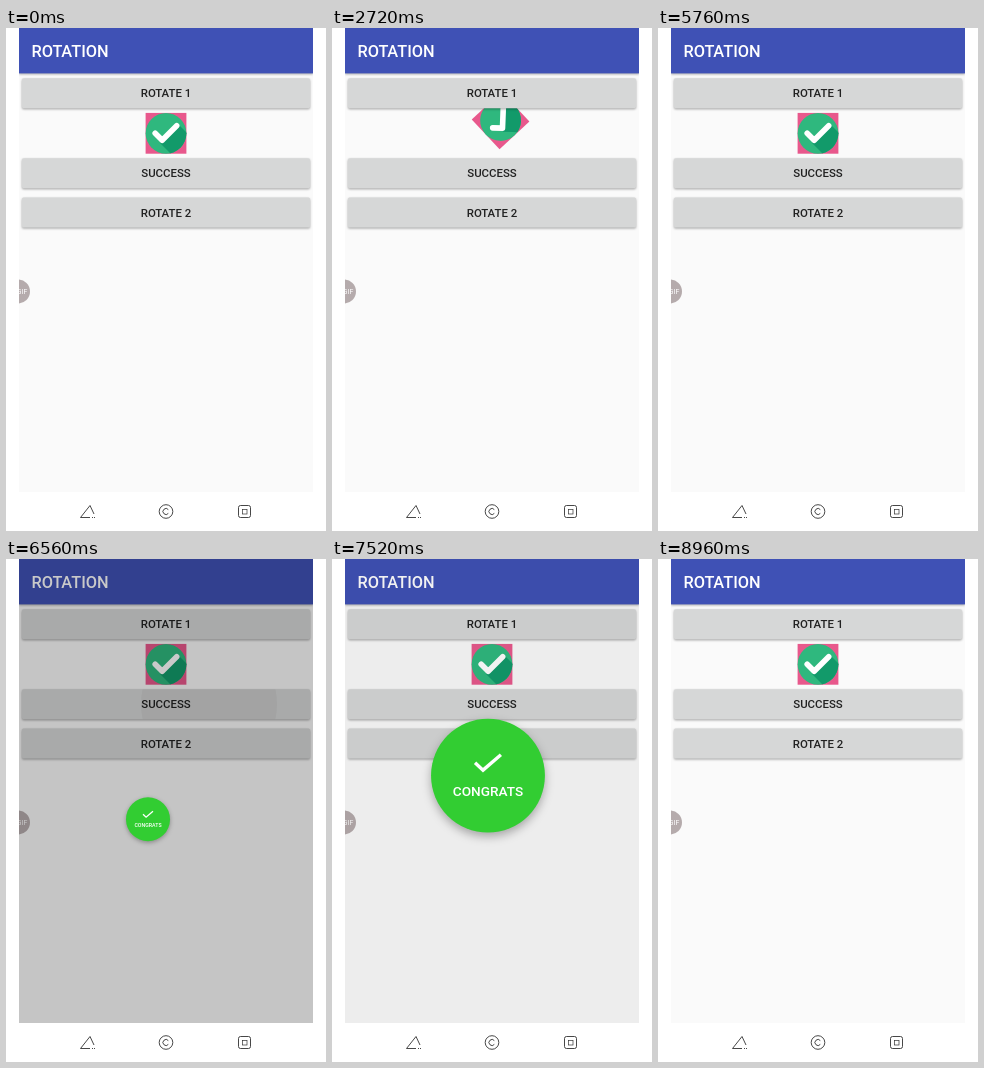
Write an HTML page that moves like this. It is 320 by 503 pixels and loops after 9600 ms.

```html
<!DOCTYPE html>
<html lang="en">
<head>
<meta charset="utf-8">
<title>Rotation</title>
<style>
  html, body { margin: 0; width: 100%; height: 100%; overflow: hidden; background: #fff; }
  svg { display: block; width: 320px; height: 503px; }
  text { font-family: Roboto, sans-serif; font-weight: 500; }
  .button { fill: #d6d7d7; filter: drop-shadow(0 1px .8px rgba(0, 0, 0, .35)); }
  .label { font-size: 11.43px; fill: #212121; text-anchor: middle; }
  .check { fill: none; stroke: #fff; }
  .nav { fill: none; stroke: #333; stroke-width: .9; }
  #bar { fill: #3f51b5; filter: drop-shadow(0 1px 1px rgba(0, 0, 0, .3)); }
  #disc { fill: #32cd32; filter: drop-shadow(0 4px 5px rgba(0, 0, 0, .3)); }
</style>
</head>
<body>
<svg viewBox="0 0 320 503">
  <defs>
    <clipPath id="app"><rect x="13" width="294" height="464"/></clipPath>
    <clipPath id="round"><circle cx="160" cy="105.3" r="20.4"/></clipPath>
    <clipPath id="clip1"><rect x="16" y="50.3" width="288" height="29.9" rx="1.6"/></clipPath>
    <clipPath id="clip2"><rect x="16" y="130.3" width="288" height="29.9" rx="1.6"/></clipPath>
  </defs>

  <g clip-path="url(#app)">
    <rect x="13" width="294" height="464" fill="#fafafa"/>
    <rect id="bar" x="13" width="294" height="45.4"/>
    <text x="25.6" y="29" font-size="16.33" fill="#fff">ROTATION</text>

    <g id="badge">
      <rect x="139.6" y="84.9" width="40.8" height="40.8" fill="#e8588c"/>
      <g clip-path="url(#round)">
        <rect x="139" y="84" width="42" height="42" fill="#2fb87e"/>
        <path d="M154 115 L173 97 L195 119 L176 137 Z" fill="#129a6a"/>
      </g>
      <path class="check" d="M149.2 105.3 L156.2 112.2 L170.7 97.8"
            stroke-width="5.6" stroke-linecap="round" stroke-linejoin="round"/>
    </g>

    <rect class="button" x="16" y="50.3" width="288" height="29.9" rx="1.6"/>
    <rect class="button" x="16" y="130.3" width="288" height="29.9" rx="1.6"/>
    <rect class="button" x="16" y="169.6" width="288" height="29.9" rx="1.6"/>
    <g clip-path="url(#clip1)"><circle id="ripple1" cx="203" cy="65"/></g>
    <g clip-path="url(#clip2)"><circle id="ripple2" cx="203" cy="145"/></g>
    <text class="label" x="160" y="69.2">ROTATE 1</text>
    <text class="label" x="160" y="149.4">SUCCESS</text>
    <text class="label" x="160" y="188.7">ROTATE 2</text>

    <circle cx="12" cy="263.5" r="12" fill="#b5abac"/>
    <text x="10.8" y="266.2" font-size="7" fill="#fff" style="font-weight:400">GIF</text>

    <rect id="dim" x="13" width="294" height="464"/>
    <g id="dialog">
      <circle id="disc" r="57.3"/>
      <path class="check" d="M-13 -13 L-5 -5.5 L13 -21" stroke-width="3.4"/>
      <text y="20.6" font-size="13.7" fill="#fff" text-anchor="middle">CONGRATS</text>
    </g>
  </g>

  <g class="nav">
    <path d="M84 477.5 L74.5 489.5 H84 M84 477.5 L88 486"/>
    <path d="M86 489.5 H89.5" stroke-dasharray="1 1"/>
    <circle cx="160" cy="483.5" r="6.8"/>
    <path d="M162.3 481.6 A3 3 0 1 0 162.3 485.4"/>
    <rect x="232.5" y="477.5" width="12" height="12" rx="2"/>
    <rect x="236.5" y="481.5" width="4.5" height="4.5" stroke-width=".7"/>
  </g>
</svg>

<script>
const LOOP = 9600, STEP = 160;
const SPIN = { start: 654, turn: 711, turns: 7, sweep: 350 };
const el = id => document.getElementById(id);
const progress = (t, start, length) => Math.min(1, Math.max(0, (t - start) / length));

function ripple(id, age) {
  const active = age >= 0 && age < 480;
  el(id).setAttribute('r', active ? 20 + age * .15 : 0);
  el(id).setAttribute('opacity', active ? .12 * (1 - age / 480) : 0);
}

function draw(t) {
  const turns = (t - SPIN.start) / SPIN.turn;
  const angle = turns > 0 && turns < SPIN.turns ? turns % 1 * SPIN.sweep : 0;
  el('badge').setAttribute('transform', `rotate(${angle} 148 88)`);

  ripple('ripple1', t - 640);
  ripple('ripple2', t - 6240);

  const enter = progress(t, 6330, 700);
  const size = enter * (1 - progress(t, 7270, 1667));
  const radius = 67 * size;
  el('dim').setAttribute('opacity', .65 * enter * (1 - progress(t, 7270, 271)));
  el('dialog').setAttribute('visibility', size > 0 ? 'visible' : 'hidden');
  el('dialog').setAttribute('transform',
    `translate(${133.2 + .4 * radius} ${287.8 - 1.25 * radius}) scale(${radius / 57.3})`);
}

function tick() {
  const t = performance.now() % LOOP;
  draw(Math.floor(t / STEP) * STEP);
  requestAnimationFrame(tick);
}
tick();
</script>
</body>
</html>
```
